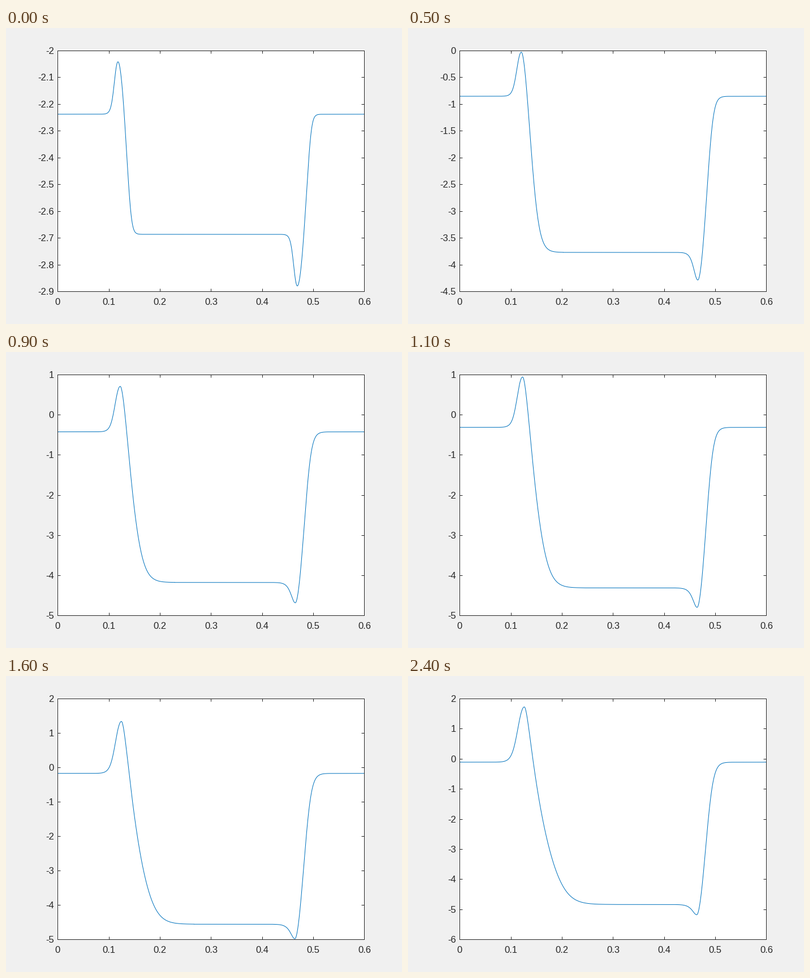
A matplotlib script that plays this animation: 700x525 px, repeating every 2500 ms.

```python
import numpy as np
import matplotlib.pyplot as plt
from matplotlib.animation import FuncAnimation

plt.rcParams["font.family"] = "Liberation Sans"
W, H, DPI = 700, 525, 100
PT = 72 / DPI              # points per pixel
FRAMES = 25
WIDTH, HEIGHT = 542, 427   # axes box in pixels
INK, BLUE, GREY = "#262626", "#0072BD", "#F0F0F0"


def settle(n, tau):
    """Exponential approach from 0 to 1."""
    return 1 - np.exp(-n / tau)


def smooth(t):
    t = np.clip(t, 0, 1)
    return t * t * (3 - 2 * t)


def bump(d, half, sharp):
    """Bell of height 1, half as high at distance `half`, exponential tail."""
    c = np.cosh(sharp) - 2
    return (1 + c) / (c + np.cosh(sharp * d / half))


def relax(dome, tail, stretch=0):
    """Way back from an extremum: distances and the share covered."""
    t = 8 * np.linspace(0, 1, 200) ** 2
    s = 1 - np.exp(-t)
    return dome * np.sqrt(s) + stretch * s ** 2 + tail * t, s


def levels(n):
    """Outer level, middle level, peak and dip."""
    fast = settle(n, 4.8)
    return (-2.238 + 2.138 * fast,
            -2.687 - 1.446 * fast - 0.03 * n,
            -2.042 + 2.687 * fast + 2.873 * settle(n, 50),
            -2.880 - 1.780 * settle(n, 3.82) - 0.022 * n)


def curve(n):
    outer, mid, peak, dip = levels(n)
    u, v = settle(n, 20), settle(n, 6)
    xp, xq = 106.5 + 11 * u, 423.5 - 4.6 * v   # pixels from the left edge

    x1 = np.linspace(0, xp, 400)
    y1 = outer + (peak - outer) * bump(xp - x1, 7.5 + 8.4 * u, 2.4)

    d, s = relax(18.2, 2.8 + 13.3 * settle(n, 13.5), 22 * smooth((n - 3) / 22))
    x2, y2 = xp + d, peak + (mid - peak) * s

    x3 = np.linspace(x2[-1], xq, 600)
    y3 = mid + (dip - mid) * bump(xq - x3, 7.4 + 1.8 * v, 2.4 - v)

    d, s = relax(19.2, 2.8 + 2.6 * v)
    x4, y4 = xq + d, dip + (outer - dip) * s

    x = np.concatenate([x1, x2, x3, x4, [WIDTH]])
    return x / WIDTH * 0.6, np.concatenate([y1, y2, y3, y4, [outer]])


def nice_ticks(lo, hi):
    """Finest round step that needs at most ten intervals."""
    for step in (0.1, 0.2, 0.5, 1, 2):
        first, last = np.floor(lo / step), np.ceil(hi / step)
        if last - first <= 10:
            break
    return np.round(np.arange(first, last + 1) * step, 6) + 0.0


def names(ticks):
    return [f"{v:g}" for v in ticks]


fig = plt.figure(figsize=(W / DPI, H / DPI), dpi=DPI, facecolor=GREY)
ax = fig.add_axes([91.4 / W, 58 / H, WIDTH / W, HEIGHT / H])
ax.set_xlim(0, 0.6)
xticks = np.arange(7) / 10
ax.set_xticks(xticks, names(xticks))
ax.tick_params(direction="in", top=True, right=True, length=5.4 * PT,
               width=PT, color=INK, labelcolor=INK, labelsize=16.67 * PT)
ax.tick_params(axis="x", pad=12 * PT)
ax.tick_params(axis="y", pad=6.4 * PT)
for spine in ax.spines.values():
    spine.set(color=INK, linewidth=PT)
line, = ax.plot([], [], color=BLUE, lw=PT)


def update(n):
    line.set_data(*curve(n))
    _, _, peak, dip = levels(n)
    ticks = nice_ticks(dip, peak)
    ax.set_yticks(ticks, names(ticks))
    ax.set_ylim(ticks[0], ticks[-1])
    return line,


anim = FuncAnimation(fig, update, frames=FRAMES, interval=100, repeat=True,
                     repeat_delay=0, blit=False)
plt.show()
```
